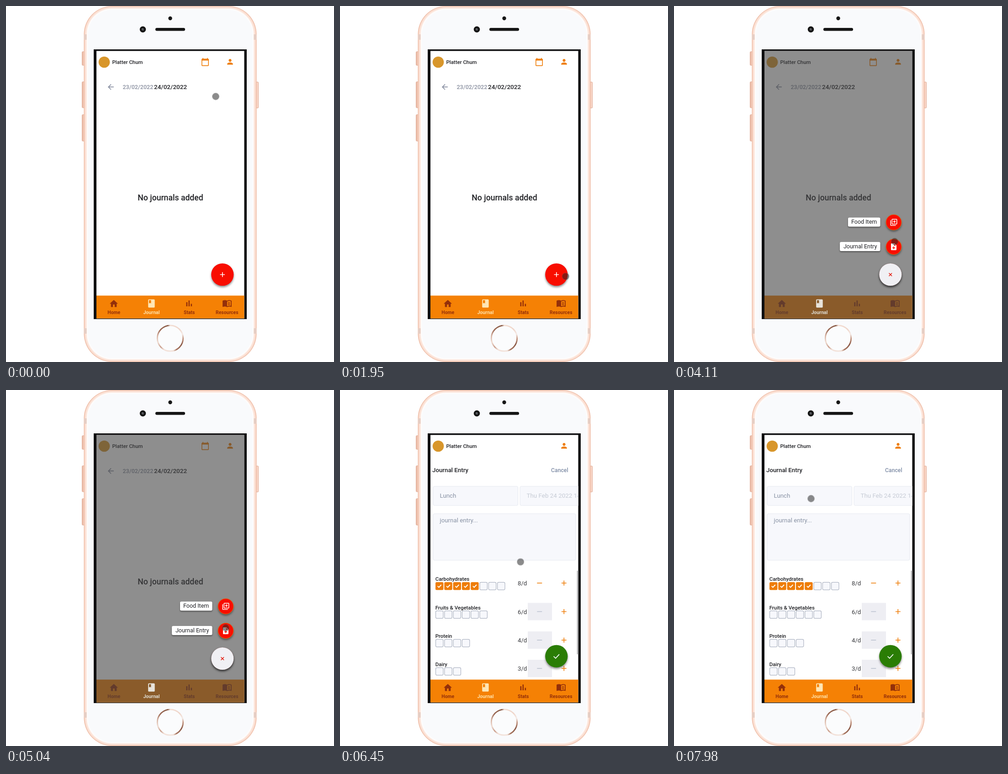
Animation, 718 px wide and 780 px high, one loop 8000 ms. Source, as an HTML page with a canvas:

```html
<!DOCTYPE html>
<html lang="en">
<head>
<meta charset="utf-8">
<title>Food journal on a phone</title>
<style>
html, body { margin: 0; width: 100%; height: 100%; overflow: hidden; background: #fff; }
canvas { display: block; }
</style>
</head>
<body>
<canvas id="stage" width="718" height="780"></canvas>
<script>
const ctx = document.getElementById('stage').getContext('2d');
const LOOP = 8000, MENU_AT = 3600, ENTRY_AT = 5700;
const ORANGE = '#ee7d08', RED = '#f80d00', RUST = '#94300a', INK = '#202125';

const icons = {
  home: 'M10 20v-6h4v6h5v-8h3L12 3 2 12h3v8z',
  book: 'M18 2H6c-1.1 0-2 .9-2 2v16c0 1.1.9 2 2 2h12c1.1 0 2-.9 2-2V4c0-1.1-.9-2-2-2zM6 4h5v8l-2.500-1.500L6 12V4z',
  bars: 'M5 9.200h3V19H5zM10.600 5h2.800v14h-2.800zM16.200 13H19v6h-2.800z',
  open: 'M21 5c-1.110-.350-2.330-.500-3.500-.500-1.950 0-4.050.400-5.500 1.500-1.450-1.100-3.550-1.500-5.500-1.500S2.450 4.900 1 6v15C3 20.400 5 20 6.500 20c1.950 0 4.050.400 5.500 1.500 1.350-.850 3.800-1.500 5.500-1.500 1.650 0 3.500.300 5.500 1V6c-.600-.450-1.250-.750-2-1zm0 13.500c-1.100-.350-2.300-.500-3.500-.500-1.700 0-4.150.650-5.500 1.500V8c1.350-.850 3.800-1.500 5.500-1.500 1.200 0 2.400.150 3.500.500zM14 9.500h5v1.400h-5zM14 12.200h5v1.400h-5zM14 14.900h5v1.400h-5z',
  calendar: 'M20 3h-1V1h-2v2H7V1H5v2H4c-1.100 0-2 .9-2 2v16c0 1.100.9 2 2 2h16c1.100 0 2-.9 2-2V5c0-1.100-.9-2-2-2zm0 18H4V8h16z',
  person: 'M12 12c2.210 0 4-1.790 4-4s-1.790-4-4-4-4 1.790-4 4 1.790 4 4 4zm0 2c-2.670 0-8 1.340-8 4v2h16v-2c0-2.660-5.330-4-8-4z',
  back: 'M20 11H7.830l5.590-5.590L12 4l-8 8 8 8 1.410-1.410L7.830 13H20z',
  addItem: 'M4 6H2v14c0 1.100.9 2 2 2h14v-2H4zM20 2H8c-1.100 0-2 .9-2 2v12c0 1.100.9 2 2 2h12c1.100 0 2-.9 2-2V4c0-1.100-.9-2-2-2zm0 14H8V4h12zM13 14h2v-3h3V9h-3V6h-2v3h-3v2h3z',
  addNote: 'M14 2H6c-1.100 0-2 .9-2 2v16c0 1.100.9 2 2 2h12c1.100 0 2-.9 2-2V8zM16 16h-3v3h-2v-3H8v-2h3v-3h2v3h3zM13 9V3.500L18.500 9z'
};
for (const name in icons) icons[name] = new Path2D(icons[name]);

function icon(name, cx, cy, scale, color) {
  ctx.save();
  ctx.translate(cx - 12 * scale, cy - 12 * scale);
  ctx.scale(scale, scale);
  ctx.fillStyle = color;
  ctx.fill(icons[name], 'evenodd');
  ctx.restore();
}

function rect(x, y, w, h, color) {
  ctx.fillStyle = color;
  ctx.fillRect(x, y, w, h);
}

function box(x, y, w, h, r, fill, stroke, line = 1) {
  ctx.beginPath();
  ctx.roundRect(x, y, w, h, r);
  if (fill) { ctx.fillStyle = fill; ctx.fill(); }
  if (stroke) { ctx.strokeStyle = stroke; ctx.lineWidth = line; ctx.stroke(); }
}

function disc(x, y, r, fill) {
  ctx.beginPath();
  ctx.arc(x, y, r, 0, Math.PI * 2);
  ctx.fillStyle = fill;
  ctx.fill();
}

function ring(x, y, r, stroke, line) {
  ctx.beginPath();
  ctx.arc(x, y, r, 0, Math.PI * 2);
  ctx.strokeStyle = stroke;
  ctx.lineWidth = line;
  ctx.stroke();
}

function text(str, x, y, size, weight, color, align = 'left') {
  ctx.font = `${weight} ${size}px Roboto, sans-serif`;
  ctx.textAlign = align;
  ctx.fillStyle = color;
  ctx.fillText(str, x, y);
}

function lines(color, width, ...paths) {
  ctx.beginPath();
  for (const p of paths) {
    ctx.moveTo(p[0], p[1]);
    for (let i = 2; i < p.length; i += 2) ctx.lineTo(p[i], p[i + 1]);
  }
  ctx.strokeStyle = color;
  ctx.lineWidth = width;
  ctx.stroke();
}

const minus = (x, y, r, color, w = 1.6) => lines(color, w, [x - r, y, x + r, y]);
const plus = (x, y, r, color, w = 1.6) => lines(color, w, [x - r, y, x + r, y], [x, y - r, x, y + r]);
const tick = (x, y, s, color, w) => lines(color, w, [x - s, y, x - s * 0.3, y + s * 0.7, x + s, y - s * 0.7]);

function shadowed(draw, blur = 4, dy = 3) {
  ctx.save();
  ctx.shadowColor = 'rgba(0,0,0,.45)';
  ctx.shadowBlur = blur;
  ctx.shadowOffsetY = dy;
  draw();
  ctx.restore();
}

function phone() {
  const edge = ctx.createLinearGradient(166, 0, 172, 0);
  edge.addColorStop(0, '#e3aa92');
  edge.addColorStop(1, '#fbe0d4');
  for (const [y, h] of [[100, 30], [166, 57], [238, 58]]) box(166.5, y, 6, h, 1.5, edge, '#e0ad98');
  box(546.5, 166.5, 6, 57, 1.5, '#f8d5c6', '#e0ad98');

  box(170.5, 0, 378, 780, 62, '#edb9a2');
  box(172, 1.2, 375, 777.6, 60.5, '#fbdfd2');
  box(175.5, 4.5, 368, 771, 57, '#fdf0ea');
  box(177.5, 6.5, 364, 767, 55, '#fff');
  box(179, 8, 361, 764, 54, '#f9fafc');
  for (const x of [171, 542.5]) for (const y of [62, 706]) rect(x, y, 5.5, 12, '#e6cec4');

  disc(359.5, 27, 4.2, '#161616');
  disc(299.5, 51.3, 6.7, '#141414');
  disc(299.5, 51.3, 2.6, '#4a4c50');
  disc(298.5, 50.3, 1, '#8b8d92');
  box(327, 48, 65, 6.4, 3.2, '#161616');

  const metal = ctx.createConicGradient(-Math.PI / 2, 359.5, 728);
  [[0, '#f3ded3'], [0.13, '#efd5c9'], [0.2, '#f5ebe6'], [0.25, '#c59681'], [0.33, '#8a5946'],
   [0.42, '#a87560'], [0.46, '#f2e2da'], [0.58, '#f3e2da'], [0.63, '#c99d8a'], [0.7, '#f0dcd2'],
   [0.78, '#d7b3a3'], [0.86, '#9a6854'], [0.97, '#8a5c48'], [1, '#f3ded3']]
    .forEach(([at, color]) => metal.addColorStop(at, color));
  disc(359.5, 728, 28, '#fbfcfd');
  ring(359.5, 728, 28.2, metal, 2.8);

  rect(192, 95, 335, 591, '#0f0f10');
  rect(198, 98.5, 323.5, 586, '#fff');
}

function header(hasCalendar) {
  disc(215, 123, 12.3, '#d8962b');
  text('Platter Chum', 232.5, 127, 11.4, 500, INK);
  if (hasCalendar) icon('calendar', 436, 122.6, 0.8, ORANGE);
  icon('person', 490.5, 122.3, 0.78, ORANGE);
}

function journalTab(color, mark) {
  icon('book', 318.4, 651.8, 0.9, color);
  text('Journal', 318.5, 675, 10.6, 700, mark, 'center');
}

function tabs() {
  rect(198, 634.5, 323.5, 50, '#f58105');
  icon('home', 236, 652.2, 0.9, RUST);
  icon('bars', 400.8, 651.6, 0.9, RUST);
  icon('open', 484, 651.2, 0.9, RUST);
  text('Home', 236.2, 675, 10.4, 700, RUST, 'center');
  text('Stats', 401.2, 675, 10.4, 700, RUST, 'center');
  text('Resources', 483.8, 675, 10.4, 700, RUST, 'center');
  journalTab('#ffe6b5', '#ffe0a6');
}

function journalPage() {
  header(true);
  icon('back', 229.4, 177.4, 0.8, '#858c9f');
  text('23/02/2022', 255.5, 182, 12.5, 500, '#8b91a1');
  text('24/02/2022', 324, 182, 13.5, 500, INK);
  text('No journals added', 360, 426, 17.6, 500, INK, 'center');
  shadowed(() => disc(473.8, 588.5, 24.6, RED));
  plus(473.8, 588.5, 5.2, '#fff', 1.6);
  tabs();
}

function menuItem(label, left, cy, name) {
  shadowed(() => box(left, cy - 10.5, 451.5 - left, 20, 3, '#fff'), 3, 2);
  text(label, 444.3, cy + 3, 12.5, 400, INK, 'right');
  shadowed(() => disc(481, cy, 17, RED));
  ring(481, cy, 17, '#d9741c', 1);
  icon(name, 481, cy, 0.75, '#fff');
}

function menu(alpha) {
  ctx.save();
  ctx.globalAlpha = alpha;
  rect(198, 98.5, 323.5, 586, 'rgba(68,68,68,.6)');
  journalTab('#e8e3da', '#ded3c4');
  menuItem('Food Item', 381, 474, 'addItem');
  menuItem('Journal Entry', 363, 527.5, 'addNote');
  shadowed(() => disc(473.8, 588.5, 24.6, '#f0f0f4'));
  lines('#e3170c', 1.5, [470.5, 585.2, 477.1, 591.8], [477.1, 585.2, 470.5, 591.8]);
  ctx.restore();
}

function portionRow(label, cy, total, done) {
  text(label, 208.7, cy - 5, 11.4, 500, INK);
  for (let i = 0; i < total; i++) {
    const x = 209.3 + i * 19.3, y = cy - 1.8;
    if (i < done) {
      box(x - 0.3, y - 0.3, 17.4, 17.4, 2.5, ORANGE);
      tick(x + 8.4, y + 8.4, 4, '#fff', 2);
    } else {
      box(x + 0.2, y + 0.2, 16.4, 16.4, 2.5, '#f7f8fc', '#aeb5c3', 1.2);
    }
  }
  text(`${total}/d`, 389, cy + 5, 13.2, 400, '#35363a');
  if (!done) rect(411, cy - 19, 53, 38, '#eeeef3');
  minus(436.8, cy, 5.5, done ? ORANGE : '#bcc3d0');
  plus(490.3, cy, 5.4, ORANGE);
}

function entryPage() {
  header(false);
  text('Journal Entry', 202, 180.3, 13.3, 500, INK);
  text('Cancel', 499.5, 179.5, 12.2, 500, '#7f8da6', 'right');

  ctx.save();
  ctx.beginPath();
  ctx.rect(198, 98.5, 323.5, 586);
  ctx.clip();
  box(204, 211, 185.5, 42, 3, '#f7f8fc', '#e6e9f0');
  box(394, 211, 160, 42, 3, '#f7f8fc', '#e6e9f0');
  box(204, 271, 312, 102, 3, '#f7f8fc', '#e6e9f0');
  text('Lunch', 218.5, 236.3, 13.3, 400, '#8791a3');
  text('Thu Feb 24 2022 14:05', 408.5, 236.3, 13.4, 400, '#c6cbd5');
  text('journal entry...', 218.5, 290, 13.3, 400, '#8791a3');
  ctx.restore();

  portionRow('Carbohydrates', 423, 8, 5);
  portionRow('Fruits & Vegetables', 485.5, 6, 0);
  portionRow('Protein', 548, 4, 0);
  portionRow('Dairy', 610, 3, 0);
  rect(518.7, 396, 2.8, 183, '#b4b4b6');

  shadowed(() => disc(473.8, 583.3, 24.6, '#2a7d05'));
  tick(473.8, 583.5, 6.2, '#fff', 1.7);
  tabs();
}

// Pointer stops: time, x, y. Equal times make a jump.
const stops = [
  [0, 459, 198], [480, 484, 305], [960, 503, 422], [1400, 499, 540], [1700, 494, 592],
  [3090, 493, 596], [3700, 493, 596], [4110, 483, 516], [4400, 481, 521], [5700, 481, 521],
  [5700, 492, 547], [5950, 492, 547], [6900, 313, 232], [7110, 311, 231], [7980, 300, 238], [8000, 300, 238]
];

function pointerAt(t) {
  let i = 0;
  while (i < stops.length - 2 && t >= stops[i + 1][0]) i++;
  const [t0, x0, y0] = stops[i], [t1, x1, y1] = stops[i + 1];
  let k = (t - t0) / (t1 - t0);
  if (t > 1700) k = k * k * (3 - 2 * k);
  return [x0 + (x1 - x0) * k, y0 + (y1 - y0) * k];
}

function pointer(t) {
  const [x, y] = pointerAt(t);
  disc(x, y, 7.2, 'rgba(35,35,35,.53)');
  ring(x, y, 7.6, 'rgba(90,90,90,.35)', 1.2);
}

function draw(t) {
  rect(0, 0, 718, 780, '#fff');
  phone();
  if (t < ENTRY_AT) {
    journalPage();
    if (t >= MENU_AT) menu(Math.min(1, (t - MENU_AT) / 120));
  } else {
    entryPage();
  }
  pointer(t);
}

const start = performance.now();
function tickFrame() {
  draw((performance.now() - start) % LOOP);
  requestAnimationFrame(tickFrame);
}
tickFrame();
</script>
</body>
</html>
```
